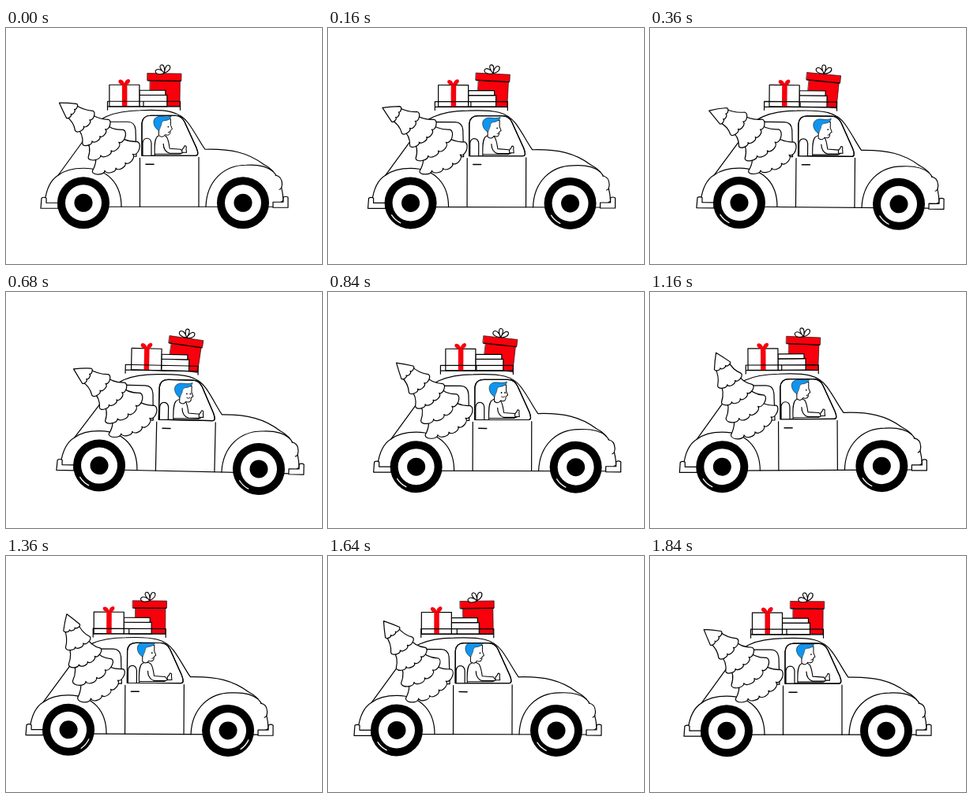
Animation, 400 px wide and 300 px high, one loop 1880 ms. Source, as an HTML page with a canvas:

```html
<!DOCTYPE html>
<html lang="en">
<head>
<meta charset="utf-8">
<title>Holiday drive</title>
<style>
html, body { margin: 0; width: 100%; height: 100%; overflow: hidden; background: #fff; }
canvas { display: block; width: 400px; height: 300px; }
</style>
</head>
<body>
<canvas id="stage"></canvas>
<script>
const LOOP = 1880, STEP = 40, RAD = Math.PI / 180;
const RED = '#f8000c', BLUE = '#0f95f0', INK = '#000';
const canvas = document.getElementById('stage');
const ctx = canvas.getContext('2d');
const dpr = window.devicePixelRatio || 1;
canvas.width = 400 * dpr;
canvas.height = 300 * dpr;

// Smooth periodic curve through [time, value] pairs
function track(...keys) {
  const n = keys.length;
  const at = i => {
    const k = keys[(i + n) % n];
    return [k[0] + Math.floor(i / n) * LOOP, k[1]];
  };
  const slope = i => {
    const a = at(i - 1), b = at(i), c = at(i + 1);
    const l = (b[1] - a[1]) / (b[0] - a[0]), r = (c[1] - b[1]) / (c[0] - b[0]);
    return l * r <= 0 ? 0 : 2 * l * r / (l + r);
  };
  return t => {
    let i = n - 1;
    while (i > 0 && keys[i][0] > t) i--;
    const [t0, a] = at(i), [t1, b] = at(i + 1);
    const d = t1 - t0, u = (t - t0) / d, v = 1 - u;
    return a * v * v * (1 + 2 * u) + b * u * u * (3 - 2 * u) +
      d * u * v * (v * slope(i) - u * slope(i + 1));
  };
}
// One swing per loop, highest at the time peak
const wave = (mean, amp, peak) => t => mean + amp * Math.cos(2 * Math.PI * (t - peak) / LOOP);

const drive = track([0, 0], [360, 15], [600, 21], [1000, 5], [1120, -4], [1420, -20], [1640, -11], [1840, -1]);
const pitch = track([0, 0], [360, 0.5], [640, 1.3], [1000, -0.7], [1360, 0.3]);
const droop = track([0, 59], [360, 75], [680, 67], [1000, 33], [1360, 19], [1640, 38]);
const bounce = wave(0.2, 0.8, 450);
const slide = wave(1.4, 3.6, 600);
const lean = wave(3, 4, 650);
const sway = wave(1.5, 3.7, 560);

function paint(path, fill, width = 1.2) {
  const p = typeof path === 'string' ? new Path2D(path) : path;
  if (fill) { ctx.fillStyle = fill; ctx.fill(p); }
  if (width) { ctx.lineWidth = width; ctx.strokeStyle = INK; ctx.stroke(p); }
}
function box(x, y, w, h, fill, width) {
  const p = new Path2D();
  p.rect(x, y, w, h);
  paint(p, fill, width);
}
function disc(x, y, r, fill) {
  ctx.beginPath();
  ctx.arc(x, y, r, 0, 7);
  ctx.fillStyle = fill;
  ctx.fill();
}
function group(draw) {
  ctx.save();
  draw();
  ctx.restore();
}
function spin(x, y, deg) {
  ctx.translate(x, y);
  ctx.rotate(deg * RAD);
  ctx.translate(-x, -y);
}

function gifts(t) {
  group(() => {
    spin(201, 99, lean(t));
    box(182, 66, 38, 33, RED, 0.6);
    box(178.5, 57.5, 43, 9, RED, 0.6);
    paint('M179 67H221', null, 1);
    spin(200, 57, 3.5 * lean(t) - 20);
    paint('M200 57C194 58 188 55 190 51C193 48 198 52 200 57C196 51 196 46 199 46' +
      'C203 46 202 52 200 57C203 49 207 47 209 50C210 54 205 57 200 57Z', '#fff', 1.1);
  });
  group(() => {
    ctx.translate(slide(t), 0);
    box(169, 85, 35, 14.5, '#fff');
    box(169, 79, 33, 6, '#fff');
    box(131, 72, 38, 27.5, '#fff');
    box(147, 72, 6.5, 27.5, RED, 0);
    paint('M150 72C145 73 141 69 143 66C146 64 149 67 150 70C151 66 155 63 157 66C158 69 154 73 150 72Z', RED, 0);
  });
  paint('M128.5 104V93H220.5V104M174 93V100M128.5 99.7H220.5');
}

function body() {
  paint('M49 221C51 205 56 193 66 187L100 140C112 113 137 105 170 104.5' +
    'C205 103 220 106 231 121C241 135 246 146 252 154C284 153 306 158 326 173' +
    'C342 181 350 198 351 219L340 227H60Z', '#fff');
  // lamp
  paint('M341 187Q349 188 349.5 198Q349 205 346 205', '#fff');
  // fenders
  paint('M66 187C75 180 86 178 98 178C129 178 146 198 146 227');
  paint('M253 227C254 194 276 174 304 174C320 173 331 176 338 182');
  // rear window, door
  paint('M112 163V119H154Q163 119 164 129L165 163Z', '#fff');
  paint('M169.5 165V227M244 164V227');
  paint('M177 173H187', null, 1.5);
  // bumpers
  paint('M45 216Q48 214 51 216V222H66V229H44Z', '#fff');
  paint('M357 215Q354 213 351 215V221H338V228H357Z', '#fff');
}

function driver(t) {
  const glass = new Path2D('M172 162V121Q173 111 183 111H214Q222 111 226 119L241 152Q245 162 240 162Z');
  paint(glass, '#fff');
  group(() => {
    ctx.clip(glass);
    const x = sway(t);
    paint('M173 163V146C174 138 183 138 184 146V163', '#fff');
    group(() => {
      ctx.translate(x * 0.5, 0);
      paint('M188 163C188 153 187 143 191 138Q197 133 203 138C206 143 206 148 207 153L221 154L224 158L220 160H188Z', '#fff', 1.1);
      paint('M199 147C199 153 202 158 207 159H222');
    });
    paint('M223 158Q222 154 225 152L226 149.5Q229 149 228 153L228.5 158Z', '#fff', 1.1);
    group(() => {
      ctx.translate(x, x * 0.7 + 1);
      paint('M193 125V135Q198 139 201 134C206 136 208 133 207.5 129L210 127L208 122V114H194Z', '#fff', 1);
      paint('M193 129C186 125 184 115 190 112C195 109 202 113 209 110Q208 116 199 116.5Q196 118 196 122Z', BLUE, 0.5);
      const facing = Math.abs(t - 680) < 200;
      disc(facing ? 202 : 205, 124, 0.9, INK);
      if (facing) disc(206.5, 124, 0.9, INK);
      paint(facing ? 'M202 129Q204 131 206 129' : 'M205 131L207 130.5', null, 0.9);
    });
  });
  paint(glass);
}

function wheel(x, y, t) {
  disc(x, y, 33, INK);
  disc(x, y, 23, '#fff');
  disc(x, y, 11.5, INK);
  if (t < 160 || t > 1740) return;
  const a = (t > 1180 && t < 1520 ? 40 : 132) * RAD;
  ctx.beginPath();
  ctx.arc(x, y, 28.5, a - 0.27, a + 0.27);
  ctx.strokeStyle = '#fff';
  ctx.lineWidth = 1.3;
  ctx.stroke();
}

// A fir of five scalloped tiers, bent along its trunk
function tree(t) {
  const tall = 98, base = 33, bent = droop(t) - base;
  const tilt = h => (base + bent * h / tall) * RAD;
  const place = (depth, w) => {
    const h = tall - depth, mid = tilt(h / 2), a = tilt(h);
    return [138 - h * Math.sin(mid) + w * Math.cos(a), 163 - h * Math.cos(mid) - w * Math.sin(a)];
  };
  for (let i = 4; i >= 0; i--) {
    const depth = 18 + 20 * i, wide = 11 + 5.8 * i, lobes = 3 + (i >> 1);
    const top = i ? depth - 22 : 0, neck = i ? wide * 0.55 : 0;
    const hem = k => {
      const u = 1 - 2 * k / lobes;
      return [depth + (2 + 3 * i) * (1 - u * u), wide * u];
    };
    const path = new Path2D();
    path.moveTo(...place(top, neck));
    path.quadraticCurveTo(...place(depth - 9, wide * 0.55), ...place(...hem(0)));
    for (let k = 0; k < lobes; k++) {
      const [d0, w0] = hem(k), [d1, w1] = hem(k + 1);
      const dd = (d1 - d0) * 0.4, dw = (w1 - w0) * 0.4;
      path.bezierCurveTo(...place(d0 - dw, w0 + dd), ...place(d1 - dw, w1 + dd), ...place(d1, w1));
    }
    path.quadraticCurveTo(...place(depth - 9, -wide * 0.55), ...place(top, -neck));
    paint(path, '#fff');
  }
}

function draw(t) {
  ctx.setTransform(dpr, 0, 0, dpr, 0, 0);
  ctx.fillStyle = '#fff';
  ctx.fillRect(0, 0, 400, 300);
  ctx.lineJoin = ctx.lineCap = 'round';
  group(() => {
    ctx.translate(drive(t), bounce(t));
    spin(200, 222, pitch(t));
    gifts(t);
    body();
    driver(t);
    wheel(98, 222, t);
    wheel(300, 222, t);
    tree(t);
  });
}

const start = performance.now();
function frame() {
  const t = (performance.now() - start) % LOOP;
  draw(Math.floor(t / STEP) * STEP);
  requestAnimationFrame(frame);
}
frame();
</script>
</body>
</html>
```
